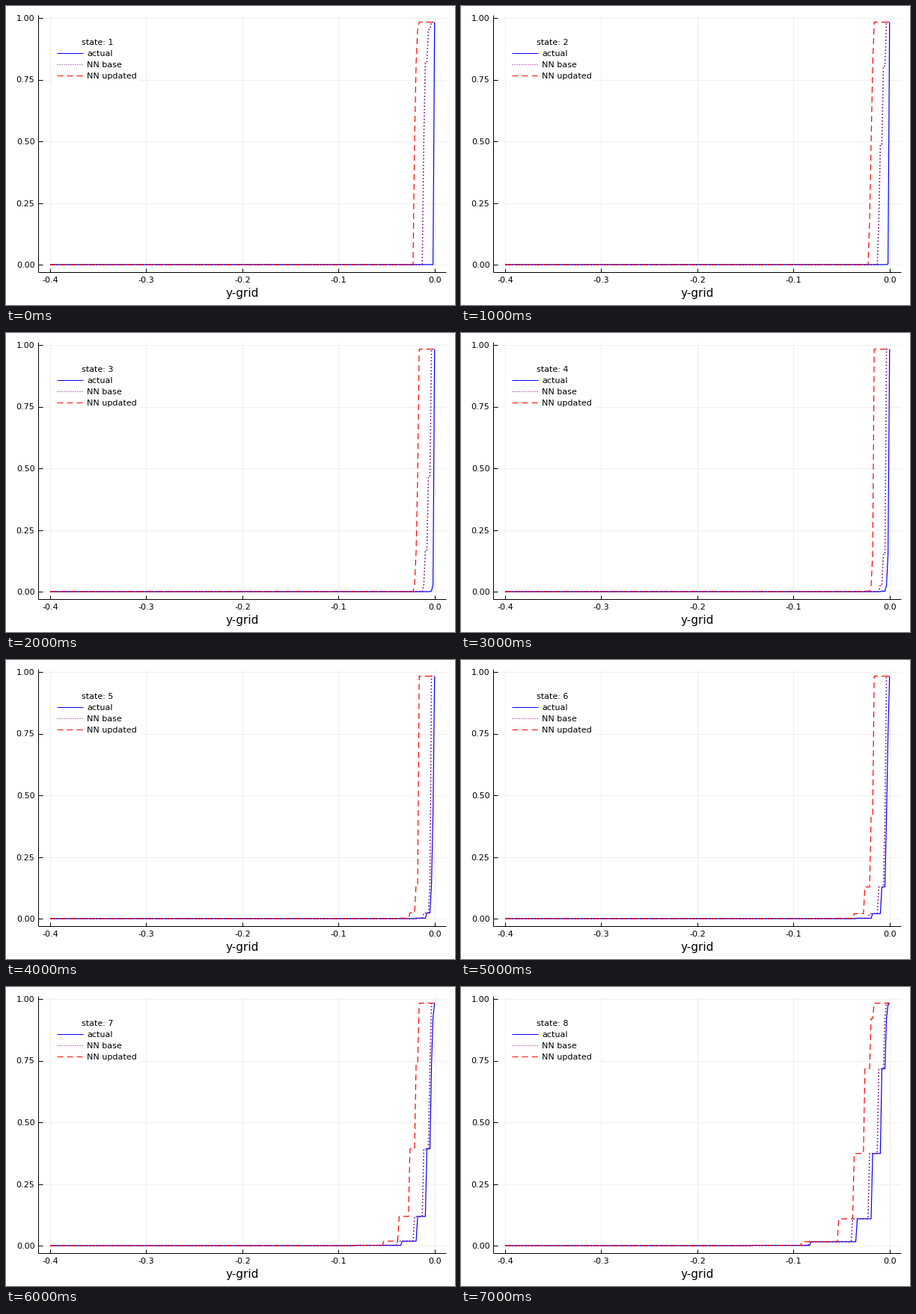
Write a matplotlib script that moves like this. It is 600 px wide and 400 px high and loops after 8000 ms.

```python
import math

import matplotlib.pyplot as plt
import numpy as np
from matplotlib.animation import FuncAnimation
from matplotlib.patches import Rectangle

W, H, DPI = 600, 400, 100
PX = 72 / DPI
STATES = 8
TOP = 0.983
GRID = np.linspace(-0.4, 0, 251)
DASH = (8, 5)

plt.rcParams["font.family"] = "DejaVu Sans"
fig = plt.figure(figsize=(W / DPI, H / DPI), dpi=DPI, facecolor="white")
ax = fig.add_axes([0, 0, 1, 1])
ax.set_xlim(0, W)
ax.set_ylim(H, 0)
ax.axis("off")


def px_x(v):
    return 572.7 + 1284.25 * v


def px_y(v):
    return 346 - 330 * v


def line(xs, ys, color, width=1.0, dash=None, z=3):
    art, = ax.plot(xs, ys, color=color, lw=width * PX, zorder=z,
                   solid_capstyle="butt", dash_capstyle="butt")
    if dash:
        art.set_dashes([d / width for d in dash])
    return art


def label(x, y, s, size=11.1, ha="left"):
    return ax.text(x, y, s, fontsize=size * PX, ha=ha, va="baseline", zorder=6)


def level(d, state):
    """Normal probability of the d-th rung, drifting slightly with the state."""
    z = 0.917 * d - 2.14 + 0.05 * (STATES - state)
    return TOP * 0.5 * (1 + math.erf(z / math.sqrt(2)))


class Curve:
    """Staircase whose step edges are grid points counted from the right.

    Rungs of `rising` climb by one with every state, those of `falling` sink.
    """

    def __init__(self, art, top, rising, falling=()):
        self.art, self.top = art, top
        self.rising, self.falling = rising, falling

    def value(self, i, state):
        if i < self.top:
            return TOP
        up = sum(i < s for s in self.rising)
        down = sum(i < s for s in self.falling)
        v = level(state - 10 + up, state)
        return max(v, level(2 - state + down, state)) if down else v

    def update(self, state):
        n = len(GRID)
        vs = np.array([self.value(n - 1 - k, state) for k in range(n)])
        self.art.set_data(px_x(GRID), px_y(vs))


# Grid, axes and ticks
for i in range(5):
    xv, yv = (i - 4) / 10, i / 4
    x, y = px_x(xv), px_y(yv)
    line([x, x], [12, 356], "#efefef", z=1)
    line([43, 588], [y, y], "#efefef", z=1)
    line([x, x], [350.5, 356], "black", z=2)
    line([43, 49], [y, y], "black", z=2)
    label(x, 369.5, f"{xv:.1f}", ha="center")
    label(38.5, y + 4, f"{yv:.2f}", ha="right")
line([43, 43], [12, 356], "black", z=2)
line([43, 588], [356, 356], "black", z=2)
label(316, 388.5, "y-grid", 15.3, "center")

# Legend
ax.add_patch(Rectangle((61, 40), 117, 61, fc="white", ec="none", zorder=2))
title = label(122, 52, "", ha="center")
rows = [("actual", "blue", None), ("NN base", "purple", (1, 2)),
        ("NN updated", "red", DASH)]
for k, (text, color, dash) in enumerate(rows):
    y = 63 + 15 * k
    line([67.5, 103], [y, y], color, dash=dash)
    label(108.5, y + 4, text)

curves = [
    Curve(line([], [], "blue", 1.2, z=3), 1, [90, 52, 22, 12, 6, 3, 2]),
    Curve(line([], [], "purple", 1.6, (1.6, 2.8), z=4), 3,
          [90, 53, 25, 14, 8, 4], [8, 7, 5]),
    Curve(line([], [], "red", 1.2, DASH, z=5), 11,
          [90, 58, 34, 24, 17, 13], [14, 13, 12]),
]


def draw(i):
    title.set_text(f"state: {i + 1}")
    for c in curves:
        c.update(i + 1)
    return [title] + [c.art for c in curves]


anim = FuncAnimation(fig, draw, frames=STATES, interval=1000, repeat=True)
plt.show()
```
